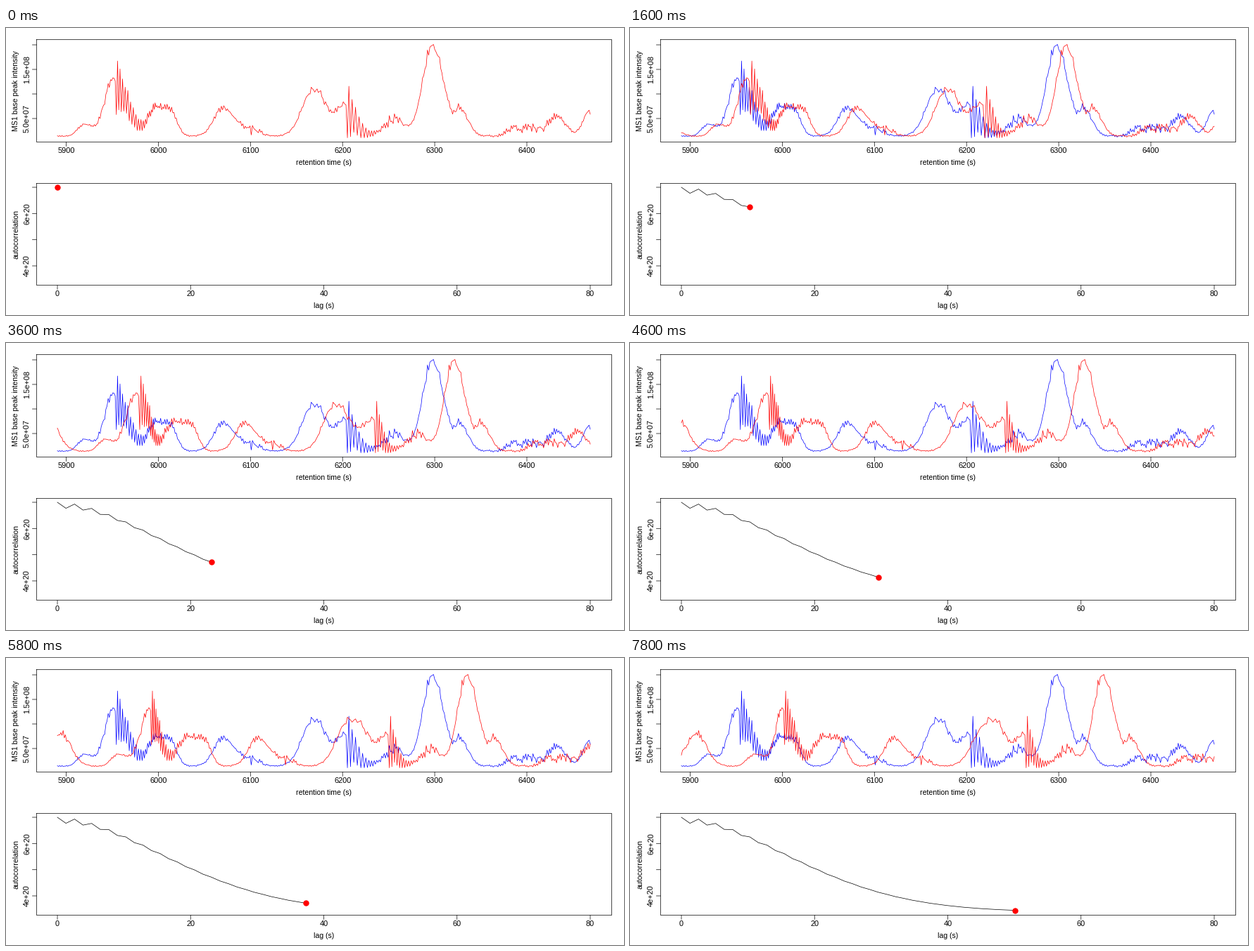
Animation, 878 px wide and 409 px high, one loop 8 s. Source, as a matplotlib script:

```python
import numpy as np
import matplotlib.pyplot as plt
from matplotlib.animation import FuncAnimation

W, H, DPI = 878, 409, 64
PX = 72 / DPI  # points per pixel
STEPS = 40
START, BASE = 73, 154  # first scan and noise floor, in pixels

plt.rcParams["font.family"] = "Liberation Sans"

fig = plt.figure(figsize=(W / DPI, H / DPI), dpi=DPI, facecolor="white")
ax = fig.add_axes([0, 0, 1, 1])
ax.set_xlim(0, W)
ax.set_ylim(H, 0)
ax.axis("off")


def line(xs, ys, color="black", width=0.7, **kw):
    return ax.plot(xs, ys, color=color, lw=width * PX, snap=False,
                   solid_joinstyle="round", **kw)[0]


def label(x, y, s, size=10.5, rotation=0):
    ax.text(x, y, s, fontsize=size * PX, color="black", rotation=rotation,
            rotation_mode="anchor", ha="center", va="baseline")


def panel(top, bottom, xticks, yticks, xtitle, ytitle):
    left, right = 43.5, 860.5
    line([left, right, right, left, left], [top, top, bottom, bottom, top])
    for x, s in xticks:
        line([x, x], [bottom, bottom + 6])
        label(x, bottom + 15.2, s, 11)
    for y, s in yticks:
        line([left - 6, left], [y, y])
        label(33, y, s, 11, 90)
    label(451.5, bottom + 32.5, xtitle)
    label(17, (top + bottom) / 2, ytitle, rotation=90)


def bell(x, center, width):
    return np.exp(-((x - center) / width) ** 2)


def peak(x, center, height, rise, fall):
    spread = np.where(x < center, rise, fall)
    return height * np.exp(-0.5 * ((x - center) / spread) ** 2)


def burst(n, first, size, decay):
    return np.where(n < first, 0, size * np.exp(-np.maximum(n - first, 0) / decay))


panel(16.5, 162.5,
      [(85.5 + 130.9 * i, str(5900 + 100 * i)) for i in range(6)],
      [(129, "5.0e+07"), (94, ""), (59, "1.5e+08"), (24, "")],
      "retention time (s)", "MS1 base peak intensity")
panel(221.5, 366.5,
      [(START + 189.25 * i, str(20 * i)) for i in range(5)],
      [(227, ""), (264.3, "6e+20"), (301.7, ""), (339, "4e+20")],
      "lag (s)", "autocorrelation")

# Scans are unevenly spaced: a base step, stretched or squeezed here and there
scan = np.arange(-STEPS, 444)
step = 1.64 + sum(a * bell(scan, c, w) for a, c, w in [
    (0.3, 62, 8), (-0.4, 84, 9), (0.06, 150, 50), (0.15, 240, 14),
    (0.8, 254, 6.5), (0.19, 285, 26), (0.08, 370, 40)])
scan_x = np.cumsum(step)
scan_x += START - scan_x[STEPS]

# Each peak: centre, height, width of its rise and of its fall
PEAKS = [
    (31, 46, 16, 14), (111, 16, 9, 10), (153, 82, 13, 19), (213, 42, 11, 15),
    (236, 24, 8, 8), (308, 39, 13, 20), (356, 6, 8, 8), (437, 68, 16, 18),
    (482, 42, 12, 14), (553, 24, 16, 14), (605, 130, 13, 17),
    (646, 35, 6, 11), (728, 13, 14, 24), (782, 27, 12, 13), (829, 36, 9, 9)]
height = sum(peak(scan_x, *p) for p in PEAKS)

# Scan-to-scan zigzag: grows with the signal, plus restless stretches and bursts
rng = np.random.default_rng(7)
fuzz = (1 + np.minimum(0.1 * height, 7) + 6 * bell(scan_x, 350, 12)
        + 6 * bell(scan_x, 545, 12) + 7 * bell(scan_x, 745, 38))
spikes = burst(scan, 51, 36, 11) + burst(scan, 247, 40, 6)
zigzag = fuzz * rng.uniform(-0.4, 1, scan.size) + spikes
signal = BASE - height + 0.2 * spikes - zigzag * (-1.0) ** scan
signal = np.clip(signal, 23, 156.5)
time_x = scan_x[STEPS:]

# Correlation decays to a floor, with an odd-even wobble that dies out
lag = np.arange(STEPS)
lag_x = START + 12.16 * lag
corr_y = 362 - 135 * np.exp(-(lag / 18) ** 1.8) + lag % 2 * 9 * np.exp(-lag / 7)

fixed = line(time_x, signal[STEPS:], "blue", zorder=3)
moving = line([], [], "red", zorder=4)
curve = line([], [], zorder=3)
dot, = ax.plot([], [], "o", color="red", ms=8.4 * PX, mew=0, snap=False, zorder=5)


def draw(k):
    fixed.set_visible(k > 0)
    moving.set_data(time_x, signal[STEPS - k:signal.size - k])
    curve.set_data(lag_x[:k + 1], corr_y[:k + 1])
    dot.set_data([lag_x[k]], [corr_y[k]])
    return fixed, moving, curve, dot


anim = FuncAnimation(fig, draw, frames=STEPS, interval=200, repeat=True,
                     repeat_delay=0, init_func=lambda: draw(0))
plt.show()
```
